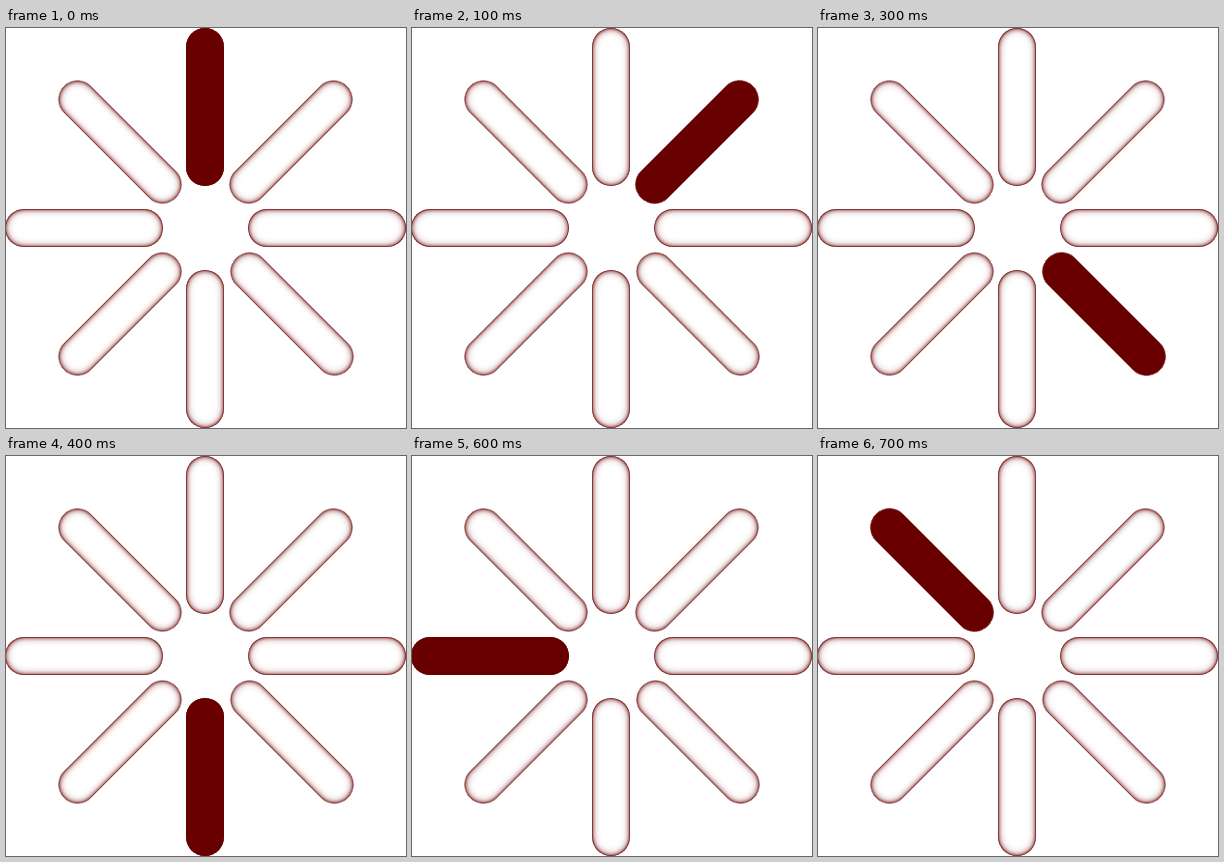
Recreate the animation shown at these times as an HTML page. Size 400 by 400 pixels, loop 0.8 s.

```html
<!DOCTYPE html>
<html lang="en">
<head>
<meta charset="utf-8">
<title>Spinner</title>
<style>
  html, body { margin: 0; width: 100%; height: 100%; overflow: hidden; background: #fff; }
  #stage { position: relative; width: 400px; height: 400px; overflow: hidden; }
  .bar, .bar i { position: absolute; width: 38px; height: 158px; border-radius: 19px; }
  .bar {
    margin: -79px 0 0 -19px;
    box-shadow:
      inset 0 0 0 1px rgba(105, 0, 0, .52),
      inset 0 0 4px rgb(105, 0, 0),
      inset 0 0 8px rgba(105, 0, 0, .6);
  }
  .bar i { left: 0; top: 0; background: #690000; opacity: 0; }
</style>
</head>
<body>
<div id="stage"></div>
<script>
  const STEP = 100;
  // Bar centres, clockwise from the top
  const centers = [
    [199, 79], [285, 114], [321, 200], [285.5, 285.5],
    [199, 321], [113.5, 285.5], [78, 200], [113.5, 114]
  ];
  const count = centers.length;
  const stage = document.getElementById('stage');

  centers.forEach(([x, y], i) => {
    const bar = document.createElement('div');
    const fill = document.createElement('i');
    bar.className = 'bar';
    bar.style.left = x + 'px';
    bar.style.top = y + 'px';
    bar.style.transform = `rotate(${i * 360 / count}deg)`;
    bar.append(fill);
    stage.append(bar);

    const anim = fill.animate(
      [
        { opacity: 1, offset: 0, easing: 'step-end' },
        { opacity: 0, offset: 1 / count, easing: 'step-end' },
        { opacity: 0, offset: 1 }
      ],
      { duration: STEP * count, delay: (i - count) * STEP, iterations: Infinity }
    );
    anim.startTime = document.timeline.currentTime;
  });
</script>
</body>
</html>
```
